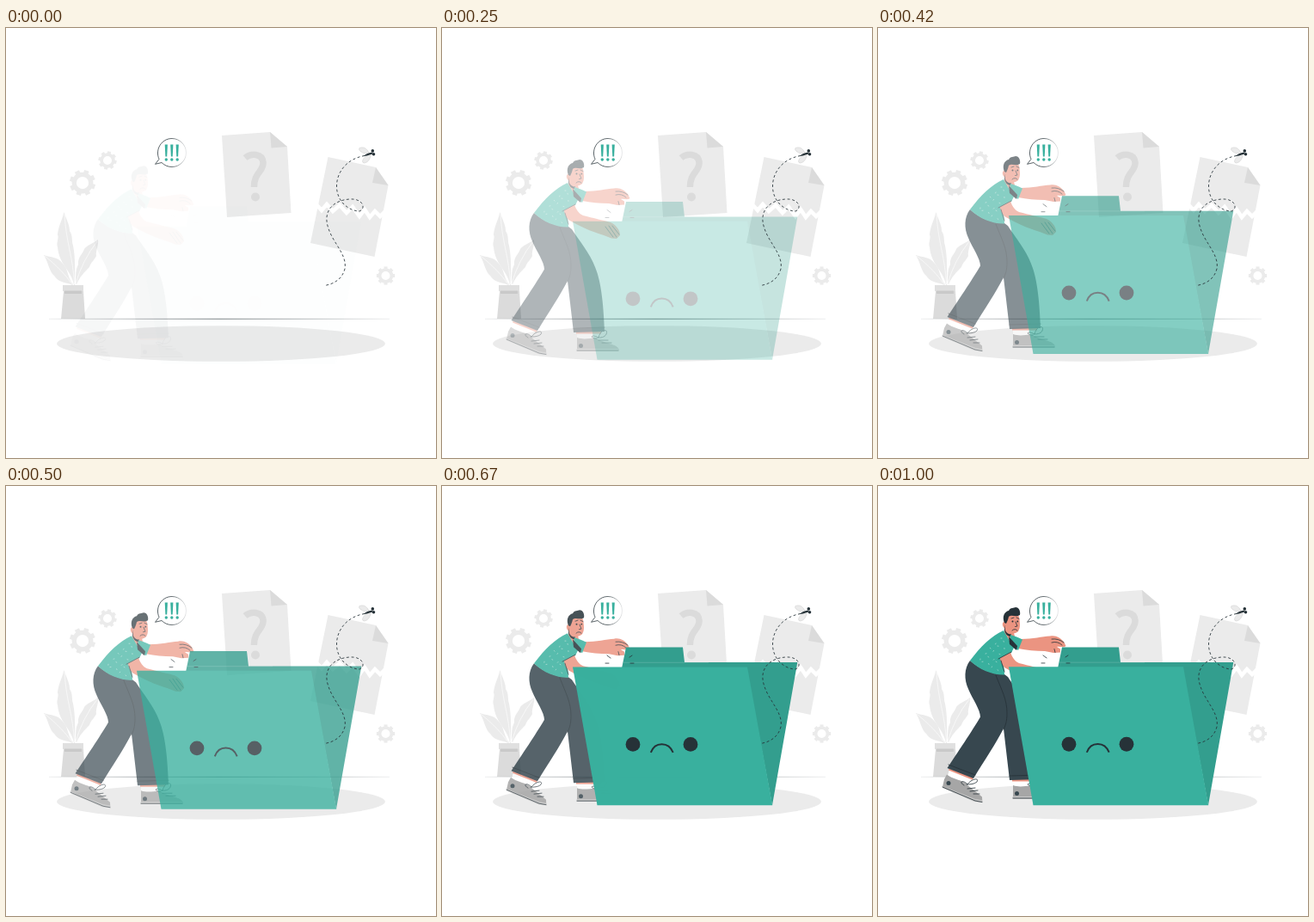
An HTML page that plays this animation: 500x500 px, repeating every 1040 ms.

```html
<!DOCTYPE html>
<html lang="en">
<head>
<meta charset="utf-8">
<title>Folder push</title>
<style>
html, body { margin: 0; width: 100%; height: 100%; overflow: hidden; background: #fff; }
svg { display: block; width: 100vw; height: 100vh; }
.ink { fill: none; stroke: #263238; stroke-width: .8; stroke-linecap: round; stroke-linejoin: round; }
.vein { fill: none; stroke: #fafafa; stroke-width: .8; }
</style>
</head>
<body>
<svg viewBox="0 0 500 500">
  <defs>
    <linearGradient id="floorInk" gradientUnits="userSpaceOnUse" x1="50" y1="0" x2="446" y2="0">
      <stop offset="0" stop-color="#263238" stop-opacity=".1"/>
      <stop offset=".5" stop-color="#263238" stop-opacity=".75"/>
      <stop offset="1" stop-color="#263238" stop-opacity=".1"/>
    </linearGradient>
    <linearGradient id="bubbleInk" gradientUnits="userSpaceOnUse" x1="172" y1="0" x2="210" y2="0">
      <stop offset=".5" stop-color="#263238"/>
      <stop offset="1" stop-color="#263238" stop-opacity=".12"/>
    </linearGradient>
  </defs>

  <ellipse cx="250" cy="367" rx="191" ry="20.8" fill="#ebebeb"/>
  <g id="gears" fill="#ebebeb" stroke="#ebebeb"></g>

  <g id="plant">
    <g fill="#ebebeb">
      <path d="M79 299C77 283 62 276 60 255C58 249 62 245 60 240C61 230 65 224 67.500 214C70 223 74 228 74 236C78 242 76 247 78 253C81 268 80 285 80 299Z"/>
      <path d="M77 299C71 295 63 298 56 288C50 283 50 274 44 264C52 267 61 266 66 274C73 281 71 290 78 298Z"/>
      <path d="M81 297C81 287 81 281 84 275C83 267 89 263 91 257C96 251 101 251 107 246C108 253 104 259 105 265C102 271 99 272 97 278C91 284 86 289 82 298Z"/>
    </g>
    <path class="vein" d="M68 217C70 250 78 266 79.500 298M45 265Q66 282 77 298M106 248Q89 270 81 297"/>
    <path d="M67 306H90L92 338H64Z" fill="#dbdbdb"/>
    <path d="M66 299H90V306H66Z" fill="#e0e0e0"/>
    <path d="M68 305.500H88V309H68Z" fill="#c9c9c9"/>
  </g>

  <g id="papers">
    <path d="M251 125L307 121L327 138L331.500 215L257 220Z" fill="#ebebeb"/>
    <path d="M307 121L308.500 139.500L327 138Z" fill="#dbdbdb"/>
    <path d="M278 151C285 145 298 146 299 156C300 167 288 168 288.500 185" fill="none" stroke="#dbdbdb" stroke-width="7.500"/>
    <circle cx="290" cy="196.500" r="5" fill="#dbdbdb"/>
    <path d="M374.500 150L430 162L444.500 183L428.500 266L354 250Z" fill="#ebebeb"/>
    <path d="M430 162L426 180L444.500 183Z" fill="#dbdbdb"/>
    <path d="M358 202L367 212L373 205L380 213L388 206L396 215L403 208L411 219L417 211L423 220L429 213L435 219L442 212" fill="none" stroke="#fff" stroke-width="4.500"/>
  </g>

  <path d="M50 338.300H446" fill="none" stroke="url(#floorInk)" stroke-width=".8"/>

  <g id="bubble">
    <path d="M178 152.500C173 141 181 128.500 193 128.500C202 128.500 209.500 136 209.500 145C209.500 154 202 161.500 193 161.500C188 161.500 184 159.500 181 156.500L173.500 158.300Z" fill="#fff" stroke="url(#bubbleInk)" stroke-width=".75"/>
    <g id="marks" fill="#39b09e"></g>
  </g>

  <g id="man">
    <!-- rear foot, then front foot -->
    <g>
      <path d="M84 326L81 337L103 347L111 338Z" fill="#fff"/>
      <path d="M83 328L82 330.500L110 341.800L111 338Z" fill="#eb9481"/>
      <path d="M80 335.500C87 341 94 341 101 345C107 351 115 356 121 361.500L121.300 367L113 365.500L75 350L77 341Z" fill="#a6a6a6"/>
      <path d="M75 349L113 364L121.300 365.500V368L112 367L75 351Z" fill="#c7c7c7"/>
      <path class="ink" d="M75 350L113 366L121 367.500M100 348C93 344 99 341 104 347C109 340 118 339 115 344C112 347 106 347 103 347M104 352L113 351M107 355L116 354M111 358L118 358" stroke-width=".7"/>
      <circle cx="82" cy="345.500" r="2.500" fill="#37474f"/>
    </g>
    <g>
      <path d="M157 339H184L183 350H157Z" fill="#fff"/>
      <path d="M156 340H185V343.500H156Z" fill="#eb9481"/>
      <path d="M157 348C165 351 174 348 180 349C188 355 204 355 206 362L205 363.500H157Z" fill="#a6a6a6"/>
      <path d="M156.500 361H206V363.500H156.500Z" fill="#c7c7c7"/>
      <path class="ink" d="M157 363H205M180 349C171 349 173 343 182 348C184 338 194 337 191 344C189 348 184 348 181 348M182 351H193M186 354H197" stroke-width=".7"/>
      <circle cx="161.500" cy="357.500" r="2.500" fill="#37474f"/>
    </g>

    <path d="M107 203C100 212 100 225 105 236C110 248 119 260 119 268.500C113 279 96 305 80.500 328L111 340C122 322 138 298 146 282L153 342L189 341C188 315 186 285 178 266C172 250 160 236 151 222L147 219C133 219 118 213 107 203Z" fill="#37474f"/>
    <path class="ink" d="M137 220C144 238 150 248 150 264C150 274 148 279 146 283M82 324L113 336M153 337L189 336" stroke-width=".6"/>

    <!-- far arm -->
    <path d="M166 178C180 178 191 175 200 174.500C207 173 212 176.500 216 181L218.500 186C216 188.500 211 186 208 187L212 189.500L212 193.500L204 194L194 192C183 192 173 191 163 189Z" fill="#eb9481"/>
    <path class="ink" d="M202 178Q210 177 216 182M202 182Q209 180 214 185M205 189.500L206 193.500" stroke-width=".6"/>

    <!-- head -->
    <path d="M147 162L147 172L154 181L161 182L158 171Z" fill="#eb9481"/>
    <path d="M148 152C154 147 162 148 164 152C165 158 166 165 163 169C159 173 153 172 150 167C144 165 143 158 148 157Z" fill="#eb9481"/>
    <path d="M147 161L148 168C150 172 153 173 155 172L154 175C150 175 148 171 147 168Z" fill="#263238"/>
    <path d="M147 159C144 152 147 146 152 145C154 141 158 142 160 141C164 141 166 146 165 150C160 153 156 149 152 152C151 156 150 158 149 160Z" fill="#263238"/>
    <path class="ink" d="M155 154L158 153M161 153L164 154.500M160 158L162 163L159.500 163.500M156 168Q159 165 162 168" stroke-width=".7"/>
    <circle cx="156.500" cy="157.500" r="1" fill="#263238"/>
    <circle cx="162.300" cy="157.500" r=".9" fill="#263238"/>

    <path d="M146 168C131 175 120 186 107 203C118 214 134 220 147 219.500C147 212 146 206 143 201L155 194L158 188L163 191L168 178.500C163 176 158 174 154 173L153 180Z" fill="#39b09e"/>
    <path d="M152 175L162 186L161 191L153 184Z" fill="#263238"/>
    <g id="flecks" stroke="#a3d8ce" stroke-width=".8" stroke-linecap="round"></g>

    <!-- near arm -->
    <path d="M142 200L154 193.500C156 199 159 204 164 206C175 209 190 212 196 214C204 218 207 224 207 229L203 233L197 232.500L188 229C174 225 157 217 147 211C144 207 142 204 142 200Z" fill="#eb9481"/>
    <path class="ink" d="M140 201L155 193M143 203L147 216M190 219L199 231M194 218L203 231M198 218L206 228" stroke-width=".5"/>
  </g>

  <g id="folder">
    <path d="M209 212L214 187.500H280L282 205H413.300L384 371.200L354 212Z" fill="#339e8e"/>
    <path d="M211 205.200H310" stroke="#fff" stroke-width=".6" opacity=".25"/>
    <path d="M152 210.300H355L384.200 371.200H180.500Z" fill="#39b09e"/>
    <circle cx="222" cy="300.300" r="8.400" fill="#263238"/>
    <circle cx="289" cy="300.300" r="8.400" fill="#263238"/>
    <path class="ink" d="M242.800 309.800C247.500 296.800 263.500 296.800 268.700 309.800" style="stroke-width:2;stroke-linecap:butt"/>
    <path class="ink" d="M192 197L196 200M190 206H194M218 199L221 197M219 206H223"/>
  </g>

  <g id="fly">
    <path class="ink" d="M417 148.500C396 152 384 168 384.500 185C385 203 400 213 411 213C419 210 415 198 400 199C381 200 370 212 373.500 228C378 249 397 262 394 280C391 292 381 298 370 299.500" style="stroke-width:.85;stroke-dasharray:3 2.600;stroke-linecap:butt"/>
    <path d="M420 146C414 146 409 142 411 139.500C415 138 419 139 422 145ZM420 148C415 151 413 156 416 157C420 157 424 153 424 147Z" fill="#ebebeb" stroke="#c0c0c0" stroke-width=".4"/>
    <path d="M415.500 149C418 146.500 421 145.500 425.500 144.500L426.500 146.500C422 147.500 419 149 415.500 149Z" fill="#263238"/>
    <circle cx="426.300" cy="142.900" r="1.800" fill="#263238"/>
    <circle cx="427.500" cy="146.800" r="1.800" fill="#263238"/>
  </g>
</svg>
<script>
const NS = 'http://www.w3.org/2000/svg';
const $ = id => document.getElementById(id);

function add(parent, tag, attrs) {
  const el = document.createElementNS(NS, tag);
  for (const k in attrs) el.setAttribute(k, attrs[k]);
  parent.appendChild(el);
}

function gear(cx, cy, r, turn) {
  const ring = r * .65, teeth = r * .38;
  add($('gears'), 'circle', { cx, cy, r: ring, fill: 'none', 'stroke-width': r * .35 });
  for (let i = 0; i < 8; i++) {
    const a = turn + i * Math.PI / 4, c = Math.cos(a), s = Math.sin(a);
    add($('gears'), 'line', {
      x1: cx + c * ring, y1: cy + s * ring, x2: cx + c * r, y2: cy + s * r,
      'stroke-width': teeth
    });
  }
}
gear(89, 180, 15, .33);
gear(118, 154, 10.6, .2);
gear(441.5, 288, 10.6, 0);

for (const x of [186.3, 192.8, 199.2]) {
  add($('marks'), 'path', { d: `M${x - 1.6} 135.500h3.200l-.7 14h-1.800z` });
  add($('marks'), 'circle', { cx: x, cy: 153, r: 1.7 });
}

// Shirt flecks: staggered rows running down the back
for (let row = 0; row < 5; row++) {
  for (let i = 0; i < 5; i++) {
    const x = 143 - row * 6 + i * 5 - (i % 2) * 2;
    const y = 177 + row * 6 + i * 3.2;
    if (x > 147 || y > 214 || (x > 141 && y > 195)) continue;
    const a = row * 2 + i * 1.3;
    add($('flecks'), 'line', { x1: x, y1: y, x2: x + Math.cos(a), y2: y + Math.sin(a) });
  }
}

function bezier(x1, y1, x2, y2) {
  const at = (a, b, s) => 3 * (1 - s) * (1 - s) * s * a + 3 * (1 - s) * s * s * b + s * s * s;
  return x => {
    let lo = 0, hi = 1;
    for (let i = 0; i < 30; i++) {
      const mid = (lo + hi) / 2;
      if (at(x1, x2, mid) < x) lo = mid; else hi = mid;
    }
    return at(y1, y2, lo);
  };
}

const LOOP = 1040, STEPS = 25, RISE = 20;
const easeOut = bezier(0, 0, .58, 1);
const overshoot = bezier(.36, -.01, .5, 1.38);

function slideUp(el, p) {
  el.setAttribute('opacity', Math.max(0, Math.min(1, p)));
  el.setAttribute('transform', `translate(0 ${RISE * (1 - p)})`);
}

function draw(ms) {
  // 24 steps a second
  const step = Math.min(STEPS - 1, Math.floor((ms % LOOP + 5) * .024));
  slideUp($('man'), easeOut((step + .6) / STEPS));
  slideUp($('folder'), overshoot((step + .9) / STEPS));
}

const start = performance.now();
function tick() {
  draw(performance.now() - start);
  requestAnimationFrame(tick);
}
tick();
</script>
</body>
</html>
```
